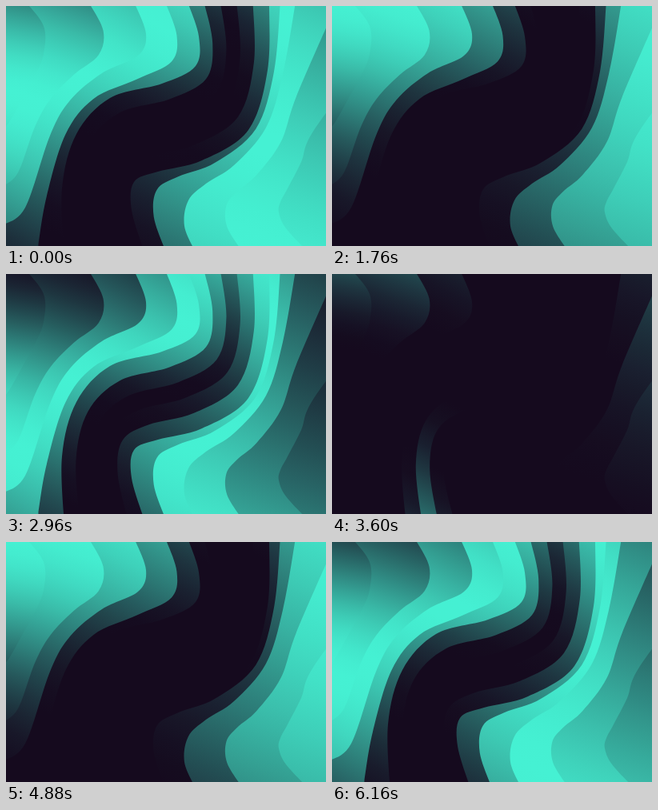
An HTML page that plays this animation: 400 by 300 pixels, repeating every 6240 ms.

```html
<!DOCTYPE html>
<html lang="en">
<head>
<meta charset="utf-8">
<title>Flowing ribbons</title>
<style>
html, body { margin: 0; width: 100%; height: 100%; overflow: hidden; background: #150a1e; }
svg { display: block; width: 100vw; height: 100vh; }
</style>
</head>
<body>
<svg id="stage" viewBox="0 0 400 300" preserveAspectRatio="none"></svg>
<script>
const NS = 'http://www.w3.org/2000/svg';
const LOOP = 6240, PULSE = 1560, STEP = 80, STOPS = 16, OVERSHOOT = .2;
const RISE = 410, FALL = 450;
const DARK = [21, 10, 30], BRIGHT = [69, 241, 211];
const stage = document.getElementById('stage');

function make(tag, attrs, parent) {
  const node = document.createElementNS(NS, tag);
  for (const key in attrs) node.setAttribute(key, attrs[key]);
  return parent.appendChild(node);
}

const mix = (a, b, k) => a + (b - a) * k;
const mixPoint = (p, q, k) => p.map((v, j) => mix(v, q[j], k));

// Guide curves from left to right, each running from top to bottom.
const guides = {
  farLeft: [[22, -8], [47, 25], [47, 60], [36, 88], [22, 113], [10, 135], [2, 148], [-8, 160]],
  left: [[160, -5], [175, 35], [165, 62], [120, 84], [80, 118], [55, 162], [24, 252], [-5, 274]],
  ribbonLeft: [[227, -5], [241, 38], [237, 75], [195, 97], [130, 115], [88, 160], [70, 228], [73, 315]],
  ribbonRight: [[329, -5], [327, 80], [303, 155], [245, 193], [190, 207], [160, 220], [157, 255], [172, 305]],
  right: [[362, -5], [346, 85], [325, 152], [285, 199], [250, 222], [228, 243], [223, 275], [237, 308]],
  farRight: [[460, 55], [385, 155], [369, 195], [352, 228], [343, 245], [341, 258], [350, 278], [378, 308]]
};

// Edges from one guide up to the next; bend crowds them towards the ribbon.
function between(from, to, count, bend) {
  return Array.from({ length: count }, (_, n) =>
    guides[from].map((p, i) => mixPoint(p, guides[to][i], (n / count) ** bend)));
}

const edges = [
  ...between('farLeft', 'left', 2, .78),
  ...between('left', 'ribbonLeft', 2, .78),
  ...between('ribbonLeft', 'ribbonRight', 5, 1),
  ...between('ribbonRight', 'right', 2, 1.25),
  ...between('right', 'farRight', 2, 1.25),
  guides.farRight
];
const CENTER = edges.length / 2;

// Smooth curve through the points, closed around everything to its right.
function regionPath(points) {
  const last = points.length - 1;
  const at = i => points[Math.max(0, Math.min(last, i))];
  let d = 'M' + points[0];
  for (let i = 0; i < last; i++) {
    const [a, b, c, e] = [at(i - 1), at(i), at(i + 1), at(i + 2)];
    const out = b.map((v, j) => v + (c[j] - a[j]) / 6);
    const into = c.map((v, j) => v - (e[j] - b[j]) / 6);
    d += `C${out} ${into} ${c}`;
  }
  return `${d}L${at(last)[0]} 320L500 320L500 -10L${points[0][0]} -10Z`;
}

// The pulse starts at the foot of the central band, climbs it and spreads to both sides.
function pulseTimes(band) {
  const spread = Math.sin(Math.PI / 2 * (Math.abs(band - CENTER) / CENTER) ** 1.3);
  return { upper: 1160 + 600 * spread, lower: 700 + 840 * spread + 10 * (band - CENTER) };
}

const defs = make('defs', {}, stage);
const stops = [];
for (let band = 0; band <= edges.length; band++) {
  const a = edges[Math.max(0, band - 1)], b = edges[Math.min(edges.length - 1, band)];
  const top = mixPoint(a[0], b[0], .5), foot = mixPoint(a.at(-1), b.at(-1), .5);
  const [x1, y1] = mixPoint(top, foot, -OVERSHOOT), [x2, y2] = mixPoint(top, foot, 1 + OVERSHOOT);
  const id = 'band' + band;
  const gradient = make('linearGradient', { id, gradientUnits: 'userSpaceOnUse', x1, y1, x2, y2 }, defs);
  const { upper, lower } = pulseTimes(band);
  for (let n = 0; n <= STOPS; n++) {
    const offset = n / STOPS;
    const peak = mix(upper, lower, mix(-OVERSHOOT, 1 + OVERSHOOT, offset));
    stops.push({ node: make('stop', { offset }, gradient), peak });
  }
  make('path', { d: band ? regionPath(a) : 'M0 0H400V300H0Z', fill: `url(#${id})` }, stage);
}

function glow(time, peak) {
  const half = PULSE / 2;
  const shift = (time - peak + half + 2 * PULSE) % PULSE - half;
  const x = Math.min(1, Math.abs(shift) / (shift < 0 ? RISE : FALL));
  return .5 + .5 * Math.cos(Math.PI * x);
}

function draw(time) {
  for (const { node, peak } of stops) {
    const color = mixPoint(DARK, BRIGHT, glow(time, peak)).map(Math.round);
    node.setAttribute('stop-color', `rgb(${color})`);
  }
}

const start = performance.now();
function tick() {
  const time = (performance.now() - start) % LOOP;
  draw(Math.floor(time / STEP) * STEP);
  requestAnimationFrame(tick);
}
tick();
</script>
</body>
</html>
```
